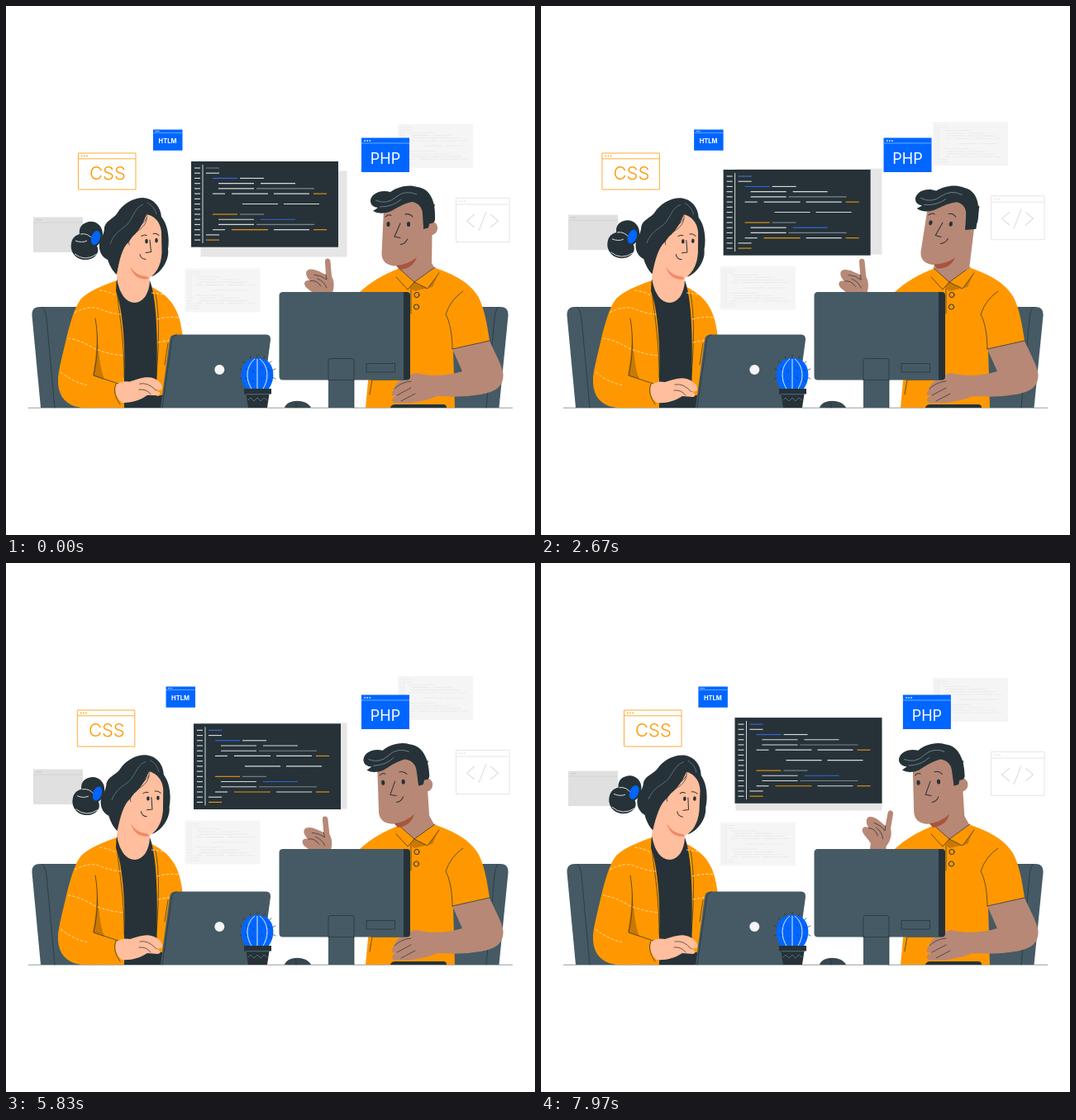
Animation of 640x640 px, one loop 8000 ms. Source, as an HTML page:

```html
<!DOCTYPE html>
<html lang="en">
<head>
<meta charset="utf-8">
<title>Coding together</title>
<style>
html, body { margin: 0; height: 100%; overflow: hidden; background: #fff; }
svg { display: block; width: 100vw; height: 100vh; }
text { font-family: Inter, "Open Sans", sans-serif; text-anchor: middle; }
.l { fill: none; stroke: #263238; stroke-width: 1; stroke-linecap: round; stroke-linejoin: round; }
.thin { stroke-width: .7; }
.dash { fill: none; stroke: #ffe0b2; stroke-width: .9; stroke-dasharray: 3.5 2; }
.slate { fill: #455a64; }
.dark { fill: #263238; }
.org { fill: #ff9800; }
.shade { fill: #c97800; }
.tan { fill: #b78876; }
.peach { fill: #ffbe9d; }
.blue { fill: #06f; }
</style>
</head>
<body>
<svg viewBox="0 0 640 640">
  <g id="back">
    <rect x="235.5" y="199.5" width="177" height="104" fill="#e6e6e6"/>
    <g id="paper1" transform="translate(474 143) scale(.511)"></g>
    <g id="paper2" transform="translate(216.5 317.5) scale(.511)"></g>
    <rect x="33" y="255.5" width="60" height="42.5" fill="#e0e0e0"/>
    <path d="M33.500 262H92.500" stroke="#cfcfcf" stroke-width=".8"/>
    <path d="M36.500 258.700h6" stroke="#bbb" stroke-width="1.3" stroke-dasharray="1.300 1.200"/>
    <g fill="none" stroke="#e0e0e0">
      <path d="M544.500 232.500H609V285.500H544.500ZM544.500 240H609" stroke-width=".8"/>
      <path d="M548 236.300h8" stroke-width="1.4" stroke-dasharray="1.400 1.700"/>
      <path d="M567 252L557.500 260L567 268M586 252L595.500 260L586 268M581 249L572 272" stroke-width="1.2"/>
    </g>
  </g>

  <g id="screen"></g>

  <g id="css">
    <path d="M.5.500H70V44.500H.5ZM.5 7.300H70" fill="none" stroke="#ffab38" stroke-width="1"/>
    <path d="M4 4h8" stroke="#ff9800" stroke-width="1.5" stroke-dasharray="1.500 1.700"/>
    <text x="36" y="32.300" font-size="22" font-weight="300" fill="#ff9800">CSS</text>
  </g>
  <g id="htlm">
    <rect class="blue" width="35.500" height="25.300"/>
    <path d="M.5 4H35" stroke="#9cf" stroke-width=".6"/>
    <path d="M2.500 2h5" stroke="#fff" stroke-width="1" stroke-dasharray="1 .9"/>
    <text x="17.500" y="16.800" font-size="7.500" font-weight="700" fill="#fff">HTLM</text>
  </g>
  <g id="php">
    <rect class="blue" width="58" height="41.500"/>
    <path d="M0 6.500H58" stroke="#8bf" stroke-width=".8"/>
    <path d="M3.500 3.500h8" stroke="#fff" stroke-width="1.500" stroke-dasharray="1.500 1.500"/>
    <text x="29" y="31" font-size="18" fill="#fff">PHP</text>
  </g>

  <path d="M27 486.200H613" stroke="#8a9296" stroke-width=".9"/>

  <!-- chairs -->
  <path class="slate" d="M31.500 375Q30.500 364 41 364H110V486H42Z"/>
  <path class="l thin" d="M44 364.500Q48 368 49 378L59 486"/>
  <path class="slate" d="M500 364H598Q608.500 364 607.500 375L596.500 486H500Z"/>
  <path class="l thin" d="M595 364.500Q592 368 591 378L581 486"/>

  <!-- woman -->
  <path class="org" d="M134 332C118 338 101 344 91 354C83 364 78 382 73 402C69 420 64 438 63 450C62 468 69 479 82 484Q92 487 110 486H200L214 402C211 372 203 352 174 339Z"/>
  <path class="dark" d="M134 331L174 332C181 350 184 390 182.500 448V486H143V452C145 405 140 362 133 345Z"/>
  <path class="peach" d="M138 300L134 329C137 348 145 359 156 359C167 358 173 347 174 333L172 305Z"/>
  <path class="shade" d="M110 394C112 415 113 436 119 452L105 447C108 430 110 412 110 394Z"/>
  <path class="l thin" d="M108 378C112 400 111 425 106 447L139 458M181 348C186 375 185 410 182 447M134 334C133 355 143 390 143 450M196 408L192 434"/>
  <path class="dash" d="M113 344Q124 345 132 350M83 371Q100 362 112 366Q126 372 139 373M75 402Q90 404 106 414Q122 421 142 423M66 443Q84 457 101 459M183 379Q196 375 209 377M184 407L200 404M176 347L190 349"/>
  <g id="womanHead">
    <path class="dark" d="M97 262C107 258 117 265 117 276C117 284 113 288 110 290C115 300 105 308 94 307C83 306 77 296 79 287C80 280 85 277 89 276C88 269 91 264 97 262Z"/>
    <path d="M90 276Q99 274 106 283M83 300Q96 310 110 300M84 284Q92 287 98 284" fill="none" stroke="#fff" stroke-width=".8"/>
    <path class="dark" d="M166 232C179 233 187 243 188 255C196 265 198 281 196 294C198 308 187 323 177 327L150 300C141 303 137 314 134 325C129 321 125 313 123 307C116 304 112 296 113 288C115 280 119 276 119 268C121 259 131 257 135 250C141 240 153 232 166 232Z"/>
    <ellipse class="blue" cx="108.500" cy="280.500" rx="5.300" ry="8.800" transform="rotate(18 108.500 280.500)"/>
    <path class="peach" d="M148 286C141 292 137 307 134 325L150 330H171C181 326 188 314 188.500 298L188 273C187 263 181 254 170 252C166 264 159 274 153 279Z"/>
    <path d="M150 315Q156 326 171 327.500L173 330Q156 333 150 315Z" fill="#ef8a68"/>
    <path class="l" d="M174 283L175.500 297.500L169 298.500M162 300.500Q163 306 169 306.500" stroke-width="1.200"/>
    <path class="l" d="M164 278.500Q167 276 170 277.500M178 275.500Q182 274.500 185 277.500" stroke-width="1.900"/>
    <ellipse class="dark" cx="170" cy="284.500" rx="1.800" ry="2.700"/>
    <ellipse class="dark" cx="182" cy="283.500" rx="1.800" ry="2.700"/>
    <path class="l thin" d="M170 251C173 266 160 271 153 277Q147 283 149 289M170 257Q166 265 157 268"/>
    <path d="M166 240C153 245 154 261 142 268Q130 276 126 288M171 238Q180 243 182 252" fill="none" stroke="#607d8b" stroke-width=".8"/>
  </g>
  <path class="dark" d="M143 486Q143 480 151 479L192 470V486Z"/>
  <g id="womanHand">
    <path class="peach" d="M133 459Q139 453 150 455C160 452 168 449 176 451C184 453 190 459 189 465C187 467 183 466 180 466C187 468 188 472 184 473L171 472C162 478 151 481 140 480Q130 472 133 459Z"/>
    <path class="l thin" d="M162 458Q172 456 181 466M161 465Q170 464 175 471" stroke="#b5634a"/>
  </g>
  <path class="org" d="M100 452L133 457Q128 468 138 482L120 486H90Z"/>
  <path class="l thin" d="M133 457Q128 468 138 482"/>

  <!-- laptop -->
  <path class="slate" d="M205 397.500H315Q320.500 398 320 404L309 486H187L198 404Q199 397.500 205 397.500Z"/>
  <path class="l thin" d="M206 398Q201 399 200.500 405L189 486"/>
  <circle cx="258.300" cy="440" r="6" fill="#f5f5f5"/>

  <!-- cactus -->
  <path class="l thin" d="M283 439l4 2M283 451l4-2M287 430l4 3M295 424l2 4M304 422v5M313 424l-2 4M321 430l-4 3M326 439l-4 2M326 451l-4-2"/>
  <path class="blue" d="M291 464C282 454 283 437 291 430C299 424 310 424 317 430C325 437 326 453 317 464Z"/>
  <path d="M297 463C289 450 291 435 301 427M304 464V427M311 463C319 450 317 435 307 427" fill="none" stroke="#fff" stroke-width=".9"/>
  <path class="l thin" d="M290 438l2 2M289 449l2 2M298 441l2 2M298 453l2 2M309 437l2 2M309 449l2 2M318 440l2 2M318 452l2 2"/>
  <path class="dark" d="M288 463H321V469.500H318.500L316 486H293L290.500 469.500H288Z"/>
  <path d="M291 469.700H318M293 477l3-3 4 4 4-4 4 4 4-4 4 3" fill="none" stroke="#607d8b" stroke-width=".8"/>
  <path d="M337 486C340 475 364 475 369 486Z" fill="#37474f"/>
  <path class="l thin" d="M350 479Q352 482 351 486"/>

  <!-- man -->
  <g id="finger">
    <path class="tan" d="M386 310Q385.500 305.500 389 305.500Q392 305.500 392.500 309L394 327C398 334 397 343 394 349L402 376H378L375 350C371 346 365 343 362 339C359 333 364 331 368 332.500C363 328 361 321 366 319C373 317 380 322 387 325Z"/>
    <path class="l thin" d="M387 325L388 331Q382 326 373 325M368 332.500Q376 331 381 339M377 330Q385 333 388 341" stroke="#6d4439"/>
  </g>
  <path class="org" d="M477 317C456 325 441 334 428 346L443 400L435 486H543L541 415L585 405C582 385 579 366 571 351C562 337 548 327 520 317Z"/>
  <path class="tan" d="M540 415L585 405C591 419 600 434 601.500 445C602 455 598 463 586 467C568 473 542 473 522 472C508 478 487 482 469 480C465 477 467 474 473 471C465 473 465 468 470 463C470 456 484 446 496 444C516 449 536 447 552 442Z"/>
  <path class="l thin" d="M473 471L490 462M470 463Q478 455 490 454M478 478L495 469" stroke="#6d4439"/>
  <path class="l thin" d="M540 415L585 405M540 415C540 398 537 382 532 373Q538 355 553 345M490 340V372M443 452L440 470"/>
  <path class="dark" d="M465 486Q466 482 471 482H529Q533 482 533 486Z"/>
  <path class="shade" d="M475 318L472 328L494 345L516 340L524 322L518 316Z"/>
  <path class="tan" d="M476 306L510 302L519 318Q508 332 494 333Q479 329 475 320Z"/>
  <path class="org" d="M475 317L494 334L486 343L472 328ZM519 316L494 334L510 342L524 323Z"/>
  <path class="l thin" d="M475 317L494 334L486 343L472 328M519 316L494 334L510 342L524 323"/>
  <circle class="l" cx="497" cy="349.500" r="3.100"/>
  <circle class="l" cx="496.500" cy="364" r="3.100"/>
  <g id="manHead">
    <path id="ear" class="tan" d="M511 263Q515 260 519 262Q524 266 521 273Q517 279 511 276Z"/>
    <path class="tan" d="M457 245L454.500 300Q455 313 470 314.500Q476 314 482 313Q498 324 515 317L516 240Q490 222 457 245Z"/>
    <path d="M472 314Q486 313 497 304Q492 318 476 319Z" fill="#a8553f"/>
    <path id="side" class="dark"/>
    <path class="dark" d="M441 237C440 229 451 221 465 225C473 219 487 215 498 219C512 221 520 234 519 258Q519 264 511 263L510 269L505 268L504 252C504 244 499 238 491 237C480 239 470 246 464 249Q452 253 444 248L450 244Q442 243 441 237Z"/>
    <path d="M447 235Q461 241 472 231Q483 222 497 228M452 243Q468 243 478 234" fill="none" stroke="#78909c" stroke-width=".8"/>
    <path class="l" d="M477 263L470 279L477 280.500M477 288.500Q483 288 485.500 282" stroke-width="1.200"/>
    <path class="l" d="M459 255Q463 251.500 466 253.500M483 252Q488 250.500 492 255" stroke-width="2"/>
    <ellipse class="dark" cx="462.500" cy="264" rx="2.100" ry="3"/>
    <ellipse class="dark" cx="487" cy="264" rx="2.100" ry="3"/>
  </g>

  <!-- monitor -->
  <path class="slate" d="M390 440H421V486H390Z"/>
  <rect class="dark" x="440" y="346" width="49" height="106.500" rx="4"/>
  <path class="slate" d="M335 346H481V452.500H335Q330.500 452.500 330.500 448V350.500Q330.500 346 335 346Z"/>
  <path class="l thin" d="M390 452V429Q390 426.500 393 426.500H418Q421 426.500 421 429V486M436.500 432.500H470.500V443H436.500ZM390 452.500H421"/>
</svg>
<script>
const LOOP = 8000;
const $ = id => document.getElementById(id);
const W = '#d5dadc', G = '#78868c', O = '#e8920f', B = '#3364dc';

// row, x, width, colour
const code = [
  [0, 18, 16, G], [1, 18, 16, W],
  [2, 26, 30, B], [2, 59, 29, W],
  [3, 33, 43, W], [3, 84, 42, W],
  [4, 33, 43, W], [4, 79, 70, G],
  [5, 26, 15, W], [5, 49, 44, W], [5, 100, 43, W], [5, 148, 16, O],
  [7, 62, 43, W], [7, 112, 43, W],
  [9, 26, 30, O], [9, 59, 29, G],
  [10, 33, 43, W], [10, 84, 42, B],
  [11, 33, 43, W], [11, 79, 70, G],
  [12, 26, 15, W], [12, 49, 44, O], [12, 100, 43, W], [12, 148, 16, O],
  [13, 18, 16, W], [14, 18, 16, O]
];

function editor(bg, tint, pen) {
  const bar = (row, x, w, c) =>
    `<path d="M${x} ${8 + row * 6.22}h${w}" stroke="${tint || c}" stroke-width="${pen}"/>`;
  let s = `<rect width="178" height="103.700" fill="${bg}"/>` +
    `<path d="M14 4V99" stroke="${tint || W}" stroke-width="1"/>`;
  for (let r = 0; r < 15; r++) s += bar(r, 4, 7, W);
  return s + code.map(c => bar(...c)).join('');
}
$('screen').innerHTML = editor('#263238', '', 1.15);
$('paper1').innerHTML = $('paper2').innerHTML = editor('#f5f5f5', '#e6e6e6', 1.3);
const firstLine = $('screen').querySelectorAll('path')[16];

// keys: [seconds, value] pairs
const mix = (a, b, k) => a + (b - a) * k;
function segment(keys, t) {
  let i = 0;
  while (i < keys.length - 2 && t > keys[i + 1][0]) i++;
  const [t0] = keys[i], [t1] = keys[i + 1];
  return [i, Math.min(1, Math.max(0, (t - t0) / (t1 - t0)))];
}
function linear(keys, t) {
  const [i, k] = segment(keys, t);
  return mix(keys[i][1], keys[i + 1][1], k);
}
// cubic that stays within its keys
function smooth(keys, t) {
  const [i, k] = segment(keys, t);
  const rate = j => (keys[j + 1][1] - keys[j][1]) / (keys[j + 1][0] - keys[j][0]);
  const slope = j => {
    if (j === 0) return rate(0);
    if (j === keys.length - 1) return rate(j - 1);
    const a = rate(j - 1), b = rate(j);
    return a * b <= 0 ? 0 : 2 * a * b / (a + b);
  };
  const h = keys[i + 1][0] - keys[i][0], q = 1 - k;
  return keys[i][1] * q * q * (1 + 2 * k) + keys[i + 1][1] * k * k * (3 - 2 * k) +
    h * k * q * (slope(i) * q - slope(i + 1) * k);
}

const track = {
  css: [[0, 87], [3.4, 69.7], [8, 100.2]],
  htlm: [[0, 178], [6.38, 195], [8, 190.3]],
  php: [[0, 430], [2.9, 413.2], [4.03, 420.3], [5.03, 426.6], [6.63, 433.3], [8, 438]],
  screenX: [[0, 224], [3.66, 219.4], [8, 234.6]],
  screenY: [[0, 188], [3.66, 201.7], [8, 187]],
  back: [[0, 0], [5.75, -6.1], [8, -4]],
  man: [[0, 0], [.83, 2.8], [1.07, 4.4], [1.7, 6], [2.67, 6.25], [3.4, 6], [4.03, 4.2],
    [5.03, -1.6], [5.93, -4.6], [6.63, -4.9], [8, -4.2]],
  woman: [[0, 0], [1.07, .9], [2.67, 1.7], [7, 1.85], [8, 3.7]],
  finger: [[0, 0], [1.07, -4.3], [2.67, -.4], [4.03, 1.3], [5.03, -1.7], [6.63, -.4], [8, 14.6]],
  typing: [[0, -2], [1.07, 0], [8, 0]]
};

const pose = (id, value) => $(id).setAttribute('transform', value);
const move = (id, x, y) => pose(id, `translate(${x} ${y})`);
const turn = (id, a, x, y) => pose(id, `rotate(${a} ${x} ${y})`);
// part rotation, part sideways slant about a pivot
const lean = (id, a, x, y) =>
  pose(id, `translate(${x} ${y}) rotate(${.6 * a}) skewX(${-.4 * a}) translate(${-x} ${-y})`);

function draw(ms) {
  const t = ms / 1000, at = name => linear(track[name], t), ease = name => smooth(track[name], t);
  move('css', at('css'), 177.5);
  move('htlm', at('htlm'), 149.5);
  move('php', at('php'), 159.5);
  move('screen', at('screenX'), at('screenY'));
  move('back', 0, at('back'));

  const tilt = ease('man'), hide = Math.min(1, Math.max(0, tilt / 4));
  lean('manHead', tilt, 497, 345);
  move('ear', -9 * hide, 0);
  $('side').setAttribute('d', `M505 240H519L${511 + 7 * hide} 268L505 270Z`);

  turn('womanHead', ease('woman'), 160, 345);
  turn('finger', ease('finger'), 430, 440);
  turn('womanHand', ease('typing'), 136, 468);

  const k = Math.min(1, t / 4);
  firstLine.setAttribute('stroke', `rgb(${mix(110, 60, k)},${mix(124, 100, k)},${mix(132, 215, k)})`);
}

function frame(now) {
  draw(now % LOOP);
  requestAnimationFrame(frame);
}
draw(0);
requestAnimationFrame(frame);
</script>
</body>
</html>
```
